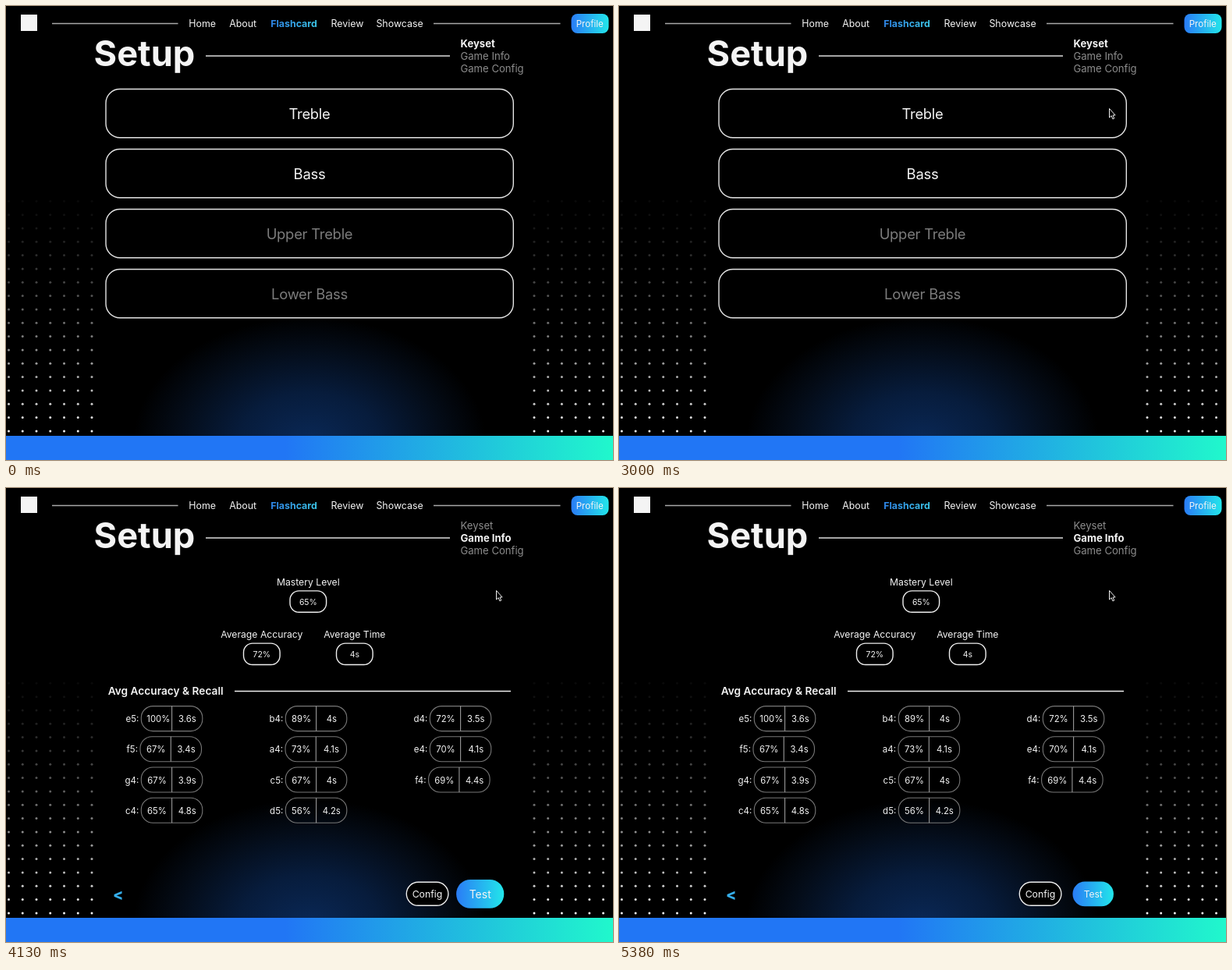
An HTML page that plays this animation: 778 px wide and 582 px high, repeating every 5520 ms.

```html
<!DOCTYPE html>
<html lang="en">
<head>
<meta charset="utf-8">
<title>Flashcard setup</title>
<style>
  html, body { margin: 0; width: 100%; height: 100%; overflow: hidden; background: #000; }
  svg { display: block; width: 778px; height: 582px; }
  text { font-family: Inter, "Open Sans", sans-serif; fill: #f4f4f4; }
</style>
</head>
<body>
<svg id="stage" viewBox="0 0 778 582">
  <defs>
    <linearGradient id="accent">
      <stop stop-color="#2a7cf6"/><stop offset="1" stop-color="#22e6ea"/>
    </linearGradient>
    <linearGradient id="label">
      <stop stop-color="#2f86ea"/><stop offset="1" stop-color="#3bc4e6"/>
    </linearGradient>
    <linearGradient id="bar">
      <stop offset=".46" stop-color="#2176f5"/><stop offset="1" stop-color="#20f8cc"/>
    </linearGradient>
    <radialGradient id="glow">
      <stop stop-color="#0a2856"/><stop offset=".4" stop-color="#071c3c"/>
      <stop offset=".75" stop-color="#040c18"/><stop offset="1" stop-color="#000"/>
    </radialGradient>
  </defs>
  <g id="backdrop"></g>
  <g id="header"></g>
  <g id="keyset"></g>
  <g id="info"></g>
  <path id="cursor" d="M0 0V11.5L2.6 9.2L4.4 13.4L6.2 12.6L4.5 8.5H7.6Z" fill="#000" stroke="#eee" stroke-width="1"/>
</svg>
<script>
const LOOP = 5520, TICK = 125;
const $ = id => document.getElementById(id);

const text = (x, y, size, str, extra = '') =>
  `<text x="${x}" y="${y}" font-size="${size}" ${extra}>${str}</text>`;
const centered = (x, y, size, str, extra = '') =>
  text(x, y, size, str, 'text-anchor="middle" ' + extra);
const box = (x, y, w, h, r, stroke = '#eee', width = 1.4, fill = 'none') =>
  `<rect x="${x}" y="${y}" width="${w}" height="${h}" rx="${r}" fill="${fill}" stroke="${stroke}" stroke-width="${width}"/>`;
const line = (x1, y1, x2, y2, color, width = 1.4) =>
  `<path d="M${x1} ${y1}L${x2} ${y2}" stroke="${color}" stroke-width="${width}"/>`;

function backdrop() {
  let out = '<ellipse cx="389" cy="560" rx="226" ry="161" fill="url(#glow)"/>';
  for (let row = 0; row < 18; row++) {
    const y = 250.3 + row * 17.33;
    const alpha = 0.04 + 0.9 * (row / 17) ** 1.3;
    for (let col = 0; col < 13; col++) {
      const x = col < 7 ? 3.5 + col * 17.75 : 677 + (col - 7) * 17.7;
      out += `<circle cx="${x}" cy="${y}" r="1.5" fill="#fff" opacity="${alpha}"/>`;
    }
  }
  return out + '<rect y="551" width="778" height="31" fill="url(#bar)"/>';
}

function header() {
  const nav = [[251.7, 'Home'], [303.7, 'About'], [437.5, 'Review'], [504.6, 'Showcase']];
  return '<rect x="19" y="11" width="21" height="21" fill="#f4f4f4"/>'
    + line(59, 22.5, 220.5, 22.5, '#a8a8a8') + line(548, 22.5, 710.5, 22.5, '#a8a8a8')
    + nav.map(([x, name]) => centered(x, 27.3, 12.4, name)).join('')
    + centered(369, 27.3, 12.4, 'Flashcard', 'font-weight="700" style="fill:url(#label)"')
    + box(724.5, 10, 48, 25, 8, 'none', 0, 'url(#accent)')
    + centered(748.3, 27, 11.6, 'Profile')
    + text(112.6, 76.5, 45.2, 'Setup', 'font-weight="700"')
    + line(256, 64, 569, 64, '#ddd', 1.5);
}

// Step list on the right of the title, with one step highlighted
const steps = active => ['Keyset', 'Game Info', 'Game Config'].map((name, i) =>
  text(582.5, 52.8 + i * 16.3, 13.1, name,
    i === active ? 'font-weight="650"' : 'style="fill:#8c8c8c"')).join('');

const keyset = () => steps(0) + ['Treble', 'Bass', 'Upper Treble', 'Lower Bass'].map((name, i) =>
  box(128, 106.5 + i * 77, 522.3, 62.3, 18, '#e4e4e4')
  + centered(389, 145.4 + i * 77, 18.4, name,
    `letter-spacing="-.25" style="fill:${i < 2 ? '#f4f4f4' : '#7c7c7c'}"`)).join('');

function stat(x, y, label, value) {
  return centered(x, y, 12.2, label)
    + box(x - 23.3, y + 6.7, 46.6, 27.4, 11.5)
    + centered(x, y + 24.4, 10.4, value);
}

function noteScore([x, row, note, accuracy, time]) {
  const y = 279.6 + row * 39.2;
  return text(x - 3, y + 20.5, 11.5, note + ':', 'text-anchor="end"')
    + box(x, y, 78.5, 32, 15, '#777', 1.1)
    + line(x + 39.3, y, x + 39.3, y + 32, '#999', 1.1)
    + centered(x + (accuracy > 99 ? 22 : 20.2), y + 20.5, 11.3, accuracy + '%')
    + centered(x + 59, y + 20.5, 11.3, time + 's');
}

function info() {
  const scores = [
    [173.3, 0, 'e5', 100, 3.6], [358.3, 0, 'b4', 89, 4], [543.3, 0, 'd4', 72, 3.5],
    [172, 1, 'f5', 67, 3.4], [358, 1, 'a4', 73, 4.1], [543.3, 1, 'e4', 70, 4.1],
    [173.3, 2, 'g4', 67, 3.9], [358.3, 2, 'c5', 67, 4], [541.6, 2, 'f4', 69, 4.4],
    [173.3, 3, 'c4', 65, 4.8], [358.3, 3, 'd5', 56, 4.2]
  ];
  return steps(1)
    + stat(387.3, 125.2, 'Mastery Level', '65%')
    + stat(327.8, 192.4, 'Average Accuracy', '72%')
    + stat(446.8, 192.4, 'Average Time', '4s')
    + text(130.8, 265.2, 13.7, 'Avg Accuracy &amp; Recall', 'font-weight="600"')
    + line(293, 260.5, 647, 260.5, '#eee', 1.6)
    + scores.map(noteScore).join('')
    + centered(143.7, 528.3, 19.5, '&lt;', 'font-weight="800" style="fill:#35aeea"')
    + box(513.3, 505.3, 53.6, 30, 15, '#eee', 1.4, '#000')
    + centered(540, 525, 12.3, 'Config')
    + '<g id="test">' + box(-26.2, -15.8, 52.4, 31.6, 15.5, 'none', 0, 'url(#accent)')
    + centered(0, 4.4, 12, 'Test') + '</g>';
}

// Underdamped spring from 0 to 1, t in ms since release
function spring(t) {
  if (t <= 0) return 0;
  const s = t / 1000, decay = 15, freq = 18;
  return 1 - Math.exp(-decay * s) * (Math.cos(freq * s) + decay / freq * Math.sin(freq * s));
}

$('backdrop').innerHTML = backdrop();
$('header').innerHTML = header();
$('keyset').innerHTML = keyset();
$('info').innerHTML = info();

const show = (id, on) => $(id).setAttribute('visibility', on ? 'visible' : 'hidden');

function draw(now) {
  // The picture advances eight times a second
  const t = Math.floor((now % LOOP) / TICK) * TICK;

  show('keyset', t < 3125);
  show('info', t >= 3125);

  show('cursor', t >= 2125);
  const p = Math.min(1, Math.max(0, (t - 2125) / 375));
  const ease = p * p * (3 - 2 * p);
  $('cursor').setAttribute('transform', `translate(${723 - 94.5 * ease} ${155.8 - 24.3 * ease})`);
  $('cursor').setAttribute('opacity', 0.7 + 0.3 * p);

  const scale = 1 + 0.2 * (spring(t - 4030) - spring(t - 4718));
  $('test').setAttribute('transform', `translate(607.7 520.4) scale(${scale})`);

  requestAnimationFrame(draw);
}
requestAnimationFrame(draw);
</script>
</body>
</html>
```
